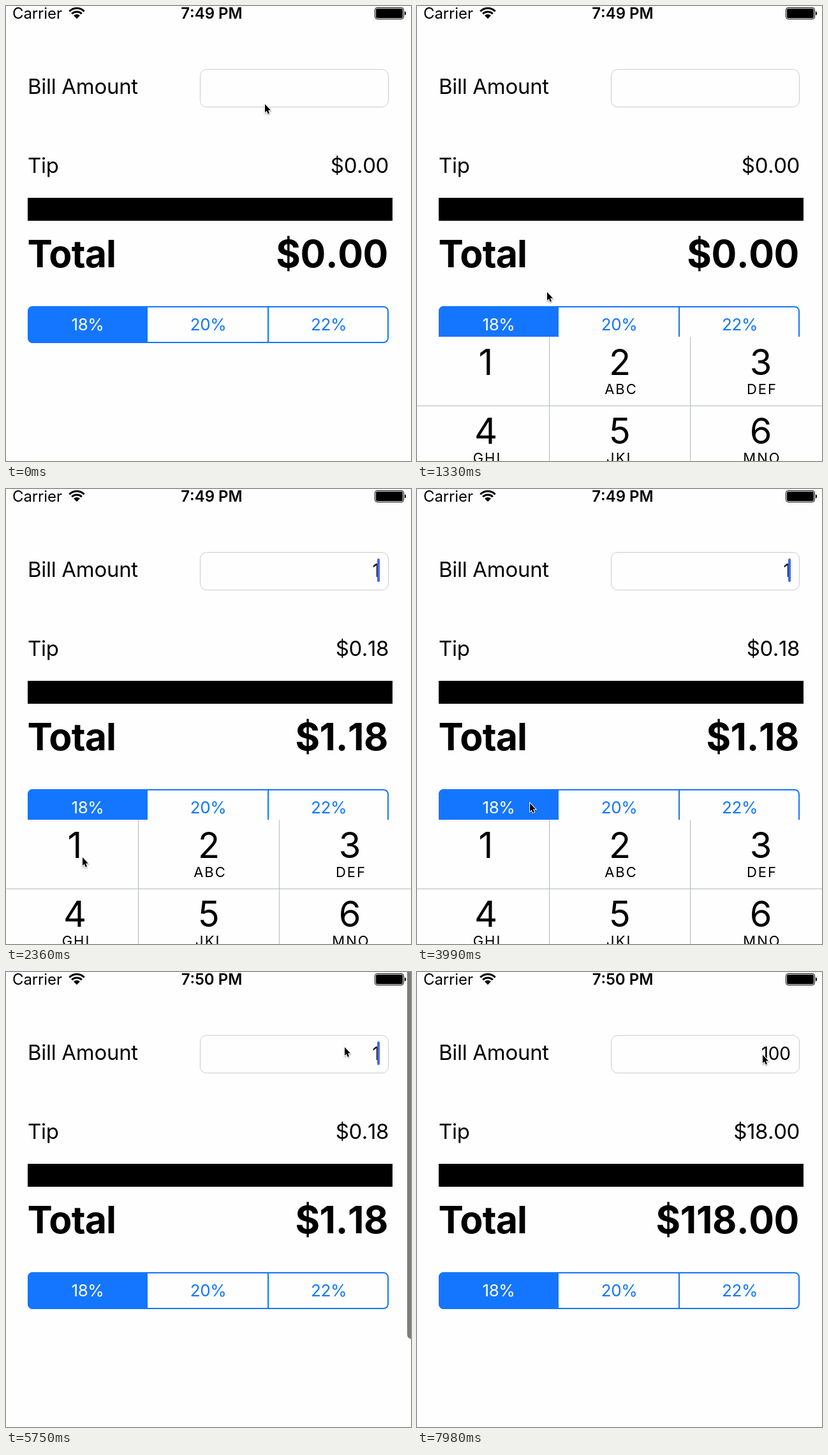
Write an HTML page with a canvas that moves like this. It is 635 px wide and 714 px high and loops after 8 s.

```html
<!DOCTYPE html>
<html lang="en">
<head>
<meta charset="utf-8">
<title>Tip calculator</title>
<style>
html, body { margin: 0; width: 100%; height: 100%; overflow: hidden; background: #fefefe; }
canvas { display: block; width: 635px; height: 714px; }
</style>
</head>
<body>
<canvas id="stage" width="635" height="714"></canvas>
<script>
const ctx = document.getElementById('stage').getContext('2d');
const LOOP = 8000, STEP = 147.6; // the picture advances in even steps
const BLUE = '#1476ff', PAPER = '#fefefe', RULE = '#b3bac0';

// Step numbers at which things happen
const FOCUS = 4, TAP = 39, KEYS = [13, 46, 49];
const STOPS = [
  { at: 2, x: 406, y: 154 }, { at: 9, x: 204, y: 449 },
  { at: 13, x: 120, y: 578 }, { at: 16, x: 120, y: 578 },
  { at: 23, x: 177, y: 493 }, { at: 28, x: 177, y: 493 },
  { at: 34, x: 300, y: 722 }, { at: 35, x: 300, y: 722 },
  { at: TAP, x: 531, y: 118 }, { at: 42, x: 542, y: 130 }
];
const ARROW = new Path2D('M0 0V13L2.8 10.4 4.8 15.2 7 14.3 5 9.6H9Z');

const clamp = v => Math.max(0, Math.min(1, v));
const easeOut = v => 1 - (1 - clamp(v)) ** 2;
const money = v => '$' + v.toFixed(2);

function pointerAt(s) {
  const i = STOPS.findIndex(p => p.at > s);
  if (i === 0) return STOPS[0];
  if (i < 0) return STOPS[STOPS.length - 1];
  const a = STOPS[i - 1], b = STOPS[i], k = (s - a.at) / (b.at - a.at);
  return { x: a.x + (b.x - a.x) * k, y: a.y + (b.y - a.y) * k };
}

// Solid after each focus or key press, then blinking with soft edges
function caretAlpha(s) {
  if (s < FOCUS) return 0;
  const last = Math.max(...[FOCUS, TAP, ...KEYS].filter(at => at <= s));
  const wait = s - last - 4;
  return wait < 0 ? 1 : clamp((Math.abs(wait % 6 - 1.5) - 0.5) / 2);
}

const flash = (s, from, to) => s < from ? 0 : clamp((to - s) / 2);

function text(str, x, y, size, o = {}) {
  ctx.font = `${o.weight || 400} ${size}px Inter, sans-serif`;
  ctx.fontKerning = o.kern || 'none';
  ctx.letterSpacing = (o.gap || 0) + 'px';
  ctx.textAlign = o.align || 'left';
  ctx.fillStyle = o.color || '#000';
  ctx.fillText(str, x, y);
}

function box(x, y, w, h, r) {
  ctx.beginPath();
  ctx.roundRect(x, y, w, h, r);
}

function rect(x, y, w, h, color) {
  ctx.fillStyle = color;
  ctx.fillRect(x, y, w, h);
}

function bar(x, y, w, h, r, color, alpha) {
  ctx.globalAlpha = alpha;
  ctx.fillStyle = color;
  box(x, y, w, h, r);
  ctx.fill();
  ctx.globalAlpha = 1;
}

function statusBar(s) {
  text('Carrier', 10, 20, 24, { gap: -0.1, kern: 'normal' });
  text(s < 36 ? '7:49 PM' : '7:50 PM', 322.5, 20, 24, { weight: 600, align: 'center' });
  ctx.strokeStyle = '#000';
  const from = -Math.PI * 0.75, to = -Math.PI * 0.25;
  ctx.lineWidth = 3;
  for (const r of [16.5, 11]) {
    ctx.beginPath();
    ctx.arc(111, 20, r, from, to);
    ctx.stroke();
  }
  ctx.beginPath();
  ctx.moveTo(111, 20);
  ctx.arc(111, 20, 7, from, to);
  ctx.fill();
  ctx.lineWidth = 1;
  box(578.5, 2.5, 45, 18, 3.5);
  ctx.stroke();
  bar(580, 4, 42, 15, 2, '#000', 1);
  bar(625, 8.5, 2, 6, [0, 2, 2, 0], '#000', 1);
}

function billField(s, bill) {
  ctx.lineWidth = 1;
  ctx.strokeStyle = '#cbcbcb';
  box(304.5, 99.5, 295, 59, 10);
  ctx.stroke();
  if (bill) text(String(bill), 585.5, 138, 28, { align: 'right', gap: -0.3 });
  bar(582, 109, 4, 37, 2, '#4468ed', caretAlpha(s));
}

function segments() {
  bar(34, 471, 188, 58, [8, 0, 0, 8], BLUE, 1);
  ctx.lineWidth = 2;
  ctx.strokeStyle = BLUE;
  box(35, 472, 564, 56, 7);
  ctx.stroke();
  rect(410, 472, 2, 56, BLUE);
  ['18%', '20%', '22%'].forEach((label, i) =>
    text(label, 128 + i * 189, 509, 26, { align: 'center', gap: -0.4, color: i ? BLUE : '#fff' }));
}

function keypad(s) {
  const shown = easeOut((s - 2) / 3) - easeOut((s - 35) / 2);
  if (!shown) return;
  const top = 714 - 195 * shown;
  rect(0, top, 635, 195, PAPER);
  for (const x of [207, 428]) rect(x, top, 1, 195, RULE);
  rect(0, top + 108, 635, 1, RULE);
  ['', 'ABC', 'DEF', 'GHI', 'JKL', 'MNO'].forEach((name, i) => {
    const x = [108, 318, 539][i % 3], y = top + (i > 2 ? 108 : 0);
    text(String(i + 1), x, y + 60, 56, { align: 'center' });
    text(name, x + 2, y + 90, 22, { align: 'center', gap: 2 });
  });
}

function pointer(s) {
  const { x, y } = pointerAt(s);
  ctx.save();
  ctx.translate(x, y);
  ctx.shadowColor = 'rgba(0,0,0,.4)';
  ctx.shadowBlur = 2;
  ctx.shadowOffsetY = 1;
  ctx.lineWidth = 2;
  ctx.strokeStyle = '#fff';
  ctx.stroke(ARROW);
  ctx.shadowColor = 'transparent';
  ctx.fillStyle = '#000';
  ctx.fill(ARROW);
  ctx.restore();
}

function draw(t) {
  const s = Math.floor((t + 10) / STEP);
  const typed = KEYS.filter(at => at <= s).length;
  const bill = typed ? 10 ** (typed - 1) : 0, tip = bill * 0.18;
  rect(0, 0, 635, 714, PAPER);
  statusBar(s);
  text('Bill Amount', 34, 138, 33, { gap: -0.3, kern: 'normal' });
  billField(s, bill);
  text('Tip', 34, 262, 33, { gap: -0.3, kern: 'normal' });
  text(money(tip), 600, 262, 33, { align: 'right', gap: -0.4 });
  rect(34, 301, 572, 36, '#000');
  text('Total', 33.5, 410, 59, { weight: 700, gap: -0.9, kern: 'normal' });
  text(money(bill + tip), 599, 410, 59, { weight: 700, align: 'right', gap: -0.4 });
  segments();
  keypad(s);
  bar(629, -10, 14, 586, 7, '#7d7d7d', Math.max(flash(s, 11, 16), flash(s, 38, 41)));
  pointer(s);
}

function tick(now) {
  draw(now % LOOP);
  requestAnimationFrame(tick);
}
draw(0);
requestAnimationFrame(tick);
</script>
</body>
</html>
```
